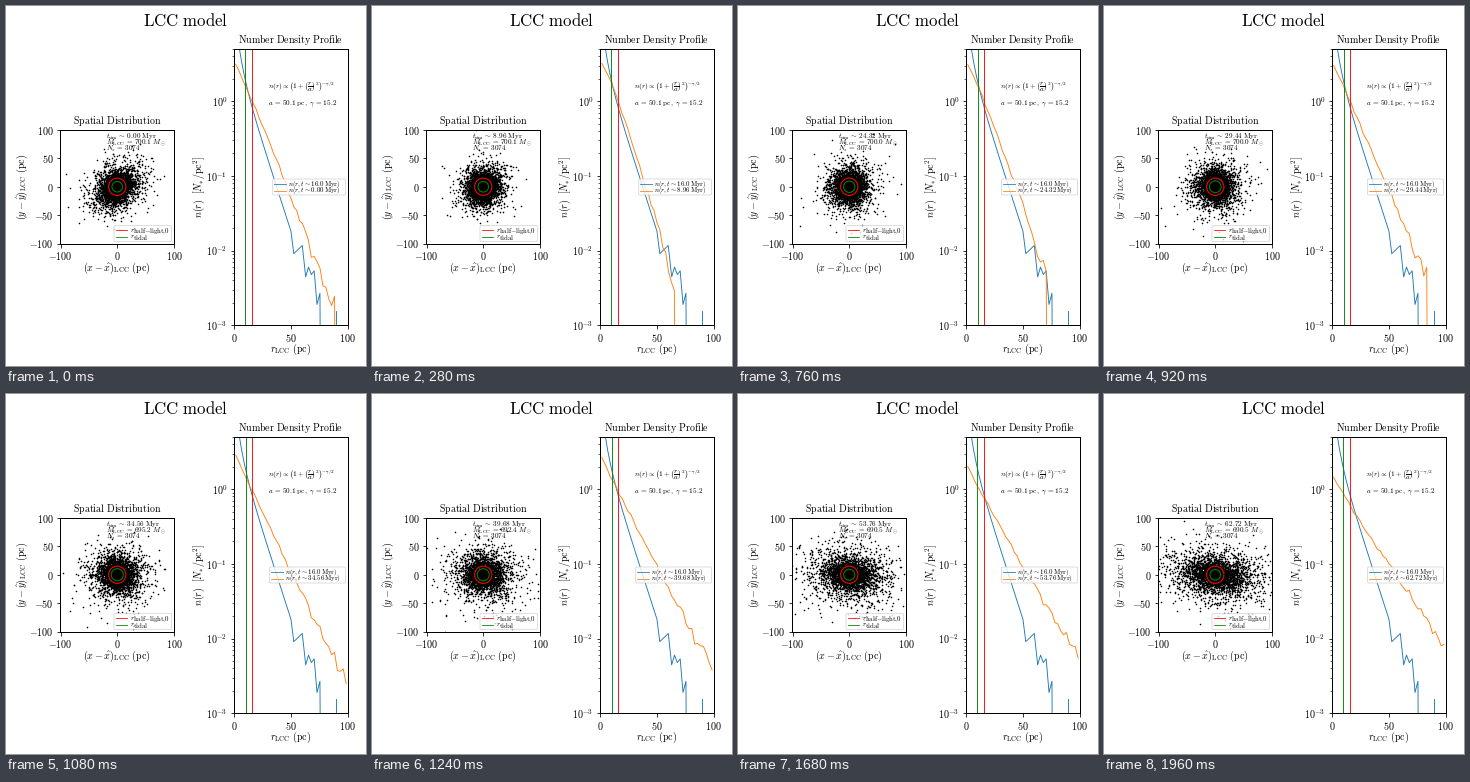
Recreate the animation shown at these times as a matplotlib script. Size 360x360 px, loop 2000 ms.

```python
import numpy as np
import matplotlib.pyplot as plt
from matplotlib.animation import FuncAnimation
from matplotlib.patches import Circle, FancyBboxPatch

SIZE, FRAMES, STEP = 360, 50, 40
N_STARS, R_HALF = 3074, 15.2
TIGHTEST = 11  # step at which the cluster is most compact
BLUE, ORANGE = "#1f77b4", "#ff7f0e"

plt.rcParams.update({
    "mathtext.fontset": "cm",
    "font.size": 10,
    "axes.linewidth": 1,
})
rng = np.random.default_rng(7)
fig = plt.figure(figsize=(5, 5), dpi=72, facecolor="white")


def panel(left, top, right, bottom):
    """Axes placed by pixel edges, y counted from the top."""
    return fig.add_axes([left / SIZE, 1 - bottom / SIZE,
                         (right - left) / SIZE, (bottom - top) / SIZE])


def tick_text(values):
    return [f"${v}$" for v in values]


sky = panel(54.5, 124, 168, 237.5)
prof = panel(228.3, 43, 341.6, 319.4)
over = panel(0, 0, SIZE, SIZE)
over.set(xlim=(0, SIZE), ylim=(SIZE, 0))
over.axis("off")
over.set_zorder(5)


def write(x, y, s, size=10, **kw):
    kw = {"ha": "left", "va": "baseline", **kw}
    return over.text(x, y, f"${s}$", fontsize=size, **kw)


def legend_box(x0, y0, x1, y1):
    box = FancyBboxPatch((x0, y0), x1 - x0, y1 - y0,
                         boxstyle="round,pad=0,rounding_size=1.2",
                         fc="white", ec="0.8", lw=0.8, alpha=0.8)
    over.add_patch(box)
    return box


def key(x, y, color, length=12):
    return over.plot([x, x + length], [y, y], color=color, lw=0.8)[0]


# Star map
ticks = [-100, -50, 0, 50, 100]
sky.set(xlim=(-100, 100), ylim=(-100, 100))
sky.set_xticks(ticks[::2], tick_text(ticks[::2]))
sky.set_yticks(ticks, tick_text(ticks))
stars, = sky.plot([], [], "o", color="black", ms=1.6, mew=0)
sky.add_patch(Circle((0, 0), R_HALF, fill=False, ec="red", lw=1.1, zorder=4))
tidal_ring = sky.add_patch(
    Circle((0, 0), 10, fill=False, ec="green", lw=1.1, zorder=4))

# Density profile
prof.set_yscale("log")
prof.set_xlim(0, 100)
prof.set_xticks([0, 50, 100], tick_text([0, 50, 100]))
powers = range(-3, 1)
prof.set_yticks([10.0 ** p for p in powers],
                tick_text([f"10^{{{p}}}" for p in powers]))
prof.set_ylim(1e-3, 5)

# Fixed profile: exponential with a cusp, then a ragged tail
radius = (np.arange(39) + 0.5) * 100 / 39
inner = radius[radius < 51]
tail_r = [52.5, 60, 63, 65.5, 68, 70.5, 73, 75.6, 76.1]
tail_n = [-2.04, -1.93, -2.35, -2.22, -2.32, -2.27, -2.72, -2.57, -4]
fixed = 0.61 - 0.047 * inner + 0.62 * np.exp(-inner / 6.2)
prof.plot(np.append(inner, tail_r), 10 ** np.append(fixed, tail_n),
          color=BLUE, lw=0.9)
prof.plot([89.7, 89.7], [1e-4, 1.58e-3], color=BLUE, lw=0.9)
curve, = prof.plot([], [], color=ORANGE, lw=0.9)
tidal_line = prof.axvline(10, color="green", lw=0.9)
prof.axvline(R_HALF, color="red", lw=0.9)
ripple = rng.normal(size=(2, radius.size))

# Each star swings on its own ellipse
start = rng.normal(size=(2, N_STARS))
swing = rng.normal(size=(2, N_STARS))
rate = rng.uniform(0.04, 0.12, N_STARS)
reach = rng.normal(size=N_STARS)

# Fixed lettering
write(180, 20.3, r"\mathrm{LCC\ model}", 16.8, ha="center")
write(111.3, 118.3, r"\mathrm{Spatial\ Distribution}", ha="center")
write(285, 37.2, r"\mathrm{Number\ Density\ Profile}", ha="center")
write(110.6, 264.5, r"(x-\hat{x})_{\mathrm{LCC}}\ \mathrm{(pc)}", ha="center")
write(16.3, 181, r"(y-\hat{y})_{\mathrm{LCC}}\ \mathrm{(pc)}",
      ha="center", va="center", rotation=90)
write(285, 346, r"r_{\mathrm{LCC}}\ \mathrm{(pc)}", ha="center")
write(193.5, 181, r"n(r)\ \ [N_{*}/\mathrm{pc}^2]",
      ha="center", va="center", rotation=90)
write(262, 82.7,
      r"n(r)\propto\left(1+\left(\dfrac{r}{a}\right)^2\right)^{-\gamma/2}",
      7.2)
write(262, 99, r"a\,=\,50.1\ \mathrm{pc},\;\gamma\,=\,15.2", 7.2)

# Legends
legend_box(108, 219.5, 165.5, 235.5)
for y, color, sub in ((223.5, "red", r"half{-}light{,}0"),
                      (230.5, "green", "tidal")):
    key(110, y, color, 10.5)
    write(123.8, y + 2, "r", 7)
    write(127, y + 3, rf"\mathrm{{{sub}}}", 6.8)

BOX_X, BOX_W = 263.5, 76
frame_box = legend_box(BOX_X, 173, BOX_X + BOX_W, 189)
keys = [key(BOX_X, 177.6, BLUE), key(BOX_X, 184.5, ORANGE)]
names = [write(BOX_X, y, r"n(r,t\sim 16.0\,\mathrm{Myr})", 6.8)
         for y in (179.6, 186.5)]
notes = [write(100, y, rf"N_s\,=\,{N_STARS}", 7.2)
         for y in (132.8, 138.6, 144.4)]


def star_positions(i):
    age = i - TIGHTEST
    scale = 15.3 + 0.006 * age ** 2
    spread = min(0.27 + 0.009 * abs(age), 0.45)
    aspect = 1 + 0.00026 * age ** 2
    shear = 0.28 * np.exp(-i / 6) - 0.1 * (i / FRAMES) ** 2
    x, y = (start * np.cos(rate * i) + swing * np.sin(rate * i)) \
        * scale * np.exp(spread * reach)
    x = x * aspect
    return x, y / aspect + shear * x


def profile(i):
    age = i - TIGHTEST
    late = (i / 49) ** 4
    steep = 0.93 + 0.35 * np.exp(-(age / 11) ** 2)
    log_n = 0.53 - 0.33 * late - (0.5 - 0.1 * late) * (radius / 15) ** steep
    count = 10 ** log_n * 2 * np.pi * radius * 2.56
    sigma = np.minimum(0.2 / np.sqrt(count), 0.2)
    wave = ripple[0] * np.cos(0.45 * i) + ripple[1] * np.sin(0.45 * i)
    edge = 62 + 0.19 * (age - 1) ** 2
    return np.where(radius < edge, 10 ** (log_n + sigma * wave), 1e-9)


def cluster_mass(i):
    u = np.clip((i - 23) / 19, 0, 1)
    return 700.1 - 0.004 * i - 9.4 * (1 - (1 - u) ** 3)


def update(i):
    t = 1.28 * i
    r_tidal = 9.3 + 1.4 * np.exp(-((i - 29) / 12) ** 2)

    stars.set_data(*star_positions(i))
    curve.set_data(radius, profile(i))
    tidal_ring.set_radius(r_tidal)
    tidal_line.set_xdata([r_tidal, r_tidal])

    notes[0].set_text(
        rf"$t_{{\mathrm{{sim}}}}\,\sim\,{t:.2f}\ \mathrm{{Myr}}$")
    notes[1].set_text(
        rf"$M_{{\mathrm{{LCC}}}}\,=\,{cluster_mass(i):.1f}\ M_\odot$")
    names[1].set_text(rf"$n(r,t\sim {t:.2f}\,\mathrm{{Myr}})$")

    # The legend grows to the left with the extra digit
    shift = 3.2 if t < 10 else 0
    left = BOX_X + shift
    frame_box.set_x(left)
    frame_box.set_width(BOX_W - shift)
    for k, name in zip(keys, names):
        k.set_xdata([left + 1.5, left + 13.5])
        name.set_x(left + 15.5)
    return []


anim = FuncAnimation(fig, update, frames=FRAMES, interval=STEP,
                     init_func=lambda: update(0), repeat=True,
                     repeat_delay=0, blit=False)
plt.show()
```
